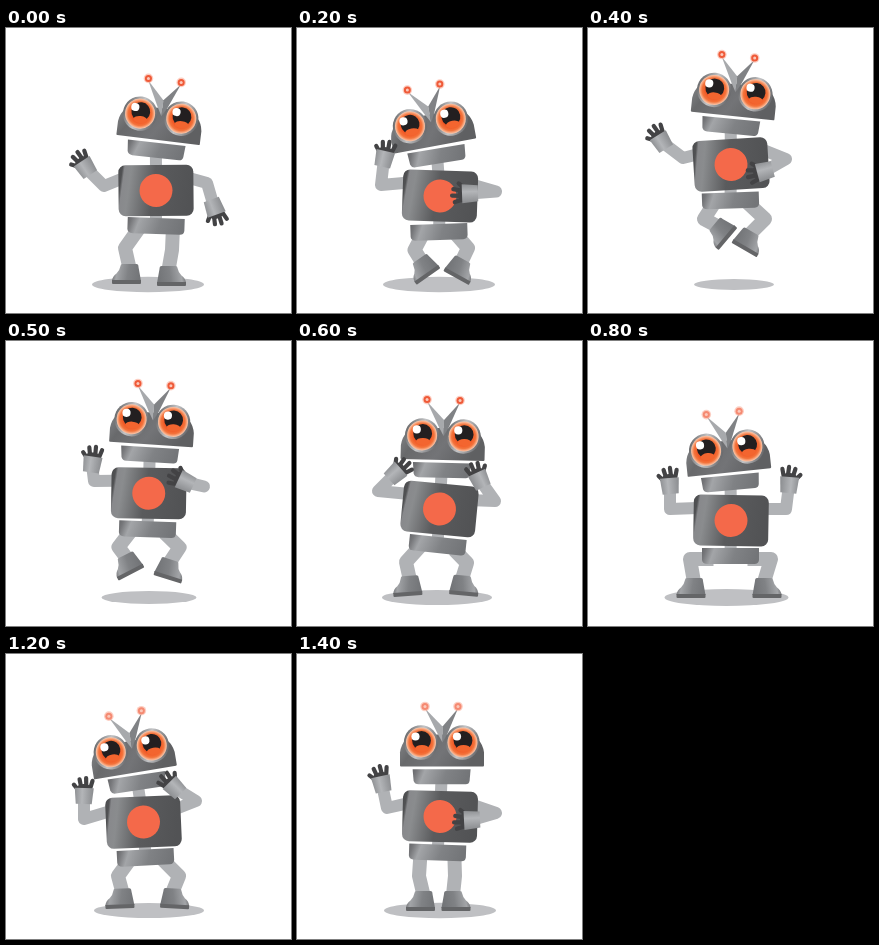
These frames come from a looping animation (285 px wide and 285 px high, 1.5 s). An HTML page:

```html
<!DOCTYPE html>
<html lang="en">
<head>
<meta charset="utf-8">
<title>Dancing robot</title>
<style>
html, body { margin: 0; width: 100%; height: 100%; overflow: hidden; background: #fff; }
svg { display: block; width: 100vw; height: 100vh; }
.pose { display: none; }
.pose.on { display: inline; }
.limb { fill: none; stroke: #b0b2b5; stroke-linejoin: round; }
.finger { fill: none; stroke: #434345; stroke-width: 4.2; stroke-linecap: round; }
</style>
</head>
<body>
<svg id="stage" viewBox="0 0 285 285" xmlns="http://www.w3.org/2000/svg">
  <defs>
    <linearGradient id="plate" x1="0" y1="0" x2="1" y2=".1">
      <stop offset="0" stop-color="#66676a"/><stop offset=".08" stop-color="#77787b"/>
      <stop offset=".22" stop-color="#a3a5a8"/><stop offset=".6" stop-color="#808285"/>
      <stop offset="1" stop-color="#737578"/>
    </linearGradient>
    <linearGradient id="cuff">
      <stop offset="0" stop-color="#8f9194"/><stop offset=".4" stop-color="#b3b5b8"/>
      <stop offset="1" stop-color="#8a8c8f"/>
    </linearGradient>
    <linearGradient id="skull" x1="0" y1="0" x2="1" y2=".25">
      <stop offset="0" stop-color="#85878a"/><stop offset=".25" stop-color="#68696b"/>
      <stop offset=".6" stop-color="#737477"/><stop offset="1" stop-color="#5f6062"/>
    </linearGradient>
    <linearGradient id="chest" x1="0" y1="0" x2="1" y2=".1">
      <stop offset="0" stop-color="#4a4b4d"/><stop offset=".06" stop-color="#515254"/>
      <stop offset=".09" stop-color="#88898c"/><stop offset=".18" stop-color="#8a8c8e"/>
      <stop offset=".5" stop-color="#5a5b5d"/><stop offset="1" stop-color="#525355"/>
    </linearGradient>
    <linearGradient id="rim" x1="0" y1=".2" x2="1" y2=".5">
      <stop offset="0" stop-color="#5e5f61"/><stop offset=".5" stop-color="#c3c4c6"/>
      <stop offset="1" stop-color="#6b6c6f"/>
    </linearGradient>
    <radialGradient id="iris">
      <stop offset=".55" stop-color="#f05523"/><stop offset=".8" stop-color="#f4743c"/>
      <stop offset="1" stop-color="#fbc9ad"/>
    </radialGradient>

    <g id="eye">
      <circle r="17.2" fill="url(#rim)"/>
      <circle r="15" fill="url(#iris)"/>
      <circle cx=".5" cy="-2" r="9.4" fill="#231f20"/>
      <ellipse cx="1" cy="6" rx="7" ry="3.6" fill="#f3652f"/>
      <circle cx="-5.5" cy="-6" r="4.1" fill="#fff"/>
    </g>
    <g id="head">
      <path d="M-42-1V-14Q-40-30-24-32H24Q40-30 42-14V-1Q42 0 41 0H-41Q-42 0-42-1Z" fill="url(#skull)"/>
      <path d="M-17-58 .5-40V-24L-4.500-33Z" fill="#a7a9ac"/>
      <path d="M16-58 .5-40V-24L5.500-33Z" fill="#808285"/>
      <use href="#eye" x="-21" y="-24"/>
      <use href="#eye" x="20.5" y="-24"/>
    </g>
    <path id="jaw" d="M-29-7.5H29L28 4Q27.500 7.500 24 7.500H-23Q-27 7.500-28 4Z" fill="url(#plate)"/>
    <path id="hips" d="M-28.500-8H28.500V4Q28 8 24 8H-23Q-28 8-28.500 4Z" fill="url(#plate)"/>
    <g id="torso">
      <rect x="-37.500" y="-25.500" width="75" height="51" rx="7" fill="url(#chest)"/>
      <circle r="16.500" fill="#f4694a"/>
    </g>
    <g id="foot">
      <path d="M-4-20H10Q12-20 12-17L14.500-3H-14.500Q-14-8-10-10.500-7-13-6-18-6-20-4-20Z" fill="url(#plate)"/>
      <path d="M-14.500-4H14.500V-1Q14.500 0 13.500 0H-13.500Q-14.500 0-14.500-1Z" fill="#646567"/>
    </g>
    <g id="hand">
      <path class="finger" d="M-7-7-10.500-11M-3-8-5-16.500M2-8 1.500-18M6-8 8-15.500"/>
      <path d="M-8-7Q-7-12 0-12T8-7Z" fill="#434345"/>
      <path d="M-9.500-8H9.500L8 8H-8Z" fill="url(#cuff)"/>
    </g>
  </defs>
</svg>
<script>
// head, body, hips, feet: x, y, turn.  arms: elbow, hand, turn.  knees: left, right.  shade: x, radius.
const wave = {
  head: [152, 112, 7], body: [150, 162.5, -.5], hips: [150, 198, 2],
  footL: [120.5, 256, 0], footR: [165.5, 258, 0], knees: [119, 220, 166, 222],
  armL: [98, 158, 80, 140, -33], armR: [201, 155, 208, 179, 160], shade: [142, 56]
};
const crouch = {
  head: [138, 118, -10.5], body: [143, 168, 2], hips: [142, 204, -2],
  footL: [131.5, 248.5, -35], footR: [159, 250, 29], knees: [117.5, 222, 171, 220],
  armL: [84, 157, 87, 131, 13], armR: [199, 163.5, 173, 165.5, 268], shade: [142, 56]
};
const leap = {
  head: [144.5, 88, 6], body: [143, 136.5, -3.5], hips: [142.5, 172.5, -2],
  footL: [140, 211, -50], footR: [156, 222, 30], knees: [116, 191, 177, 191],
  armL: [95, 130, 74, 114, -32], armR: [198, 131, 177, 143, 255], shade: [146, 40]
};
const cheeks = {
  head: [145.5, 119, 1.5], body: [142.5, 168, 5.5], hips: [140.5, 204, 6],
  footL: [111, 255, -4], footR: [166.5, 254.5, 5], knees: [109, 221, 170, 222],
  armL: [81, 150, 98, 133, 48], armR: [198, 160, 183, 139, 335], shade: [140, 55]
};
const squat = {
  head: [141.5, 131.5, -6], body: [143, 179.5, 1], hips: [142.5, 215, 0],
  footL: [103, 257, 0], footR: [179, 257, 0], knees: [102, 218, 183, 218],
  armL: [82, 168, 82, 145, -5], armR: [198, 168, 201, 144, 5], shade: [138.5, 62], glow: [1]
};
const lean = {
  head: [129.5, 118.5, -9.5], body: [137.5, 168, -2.5], hips: [139.5, 203.5, -3],
  footL: [114, 254.5, -2], footR: [168.5, 254.5, 3], knees: [112, 222, 173, 222],
  armL: [78, 165, 78, 142, 2], armR: [190, 147, 169, 134, -45], shade: [143, 55], glow: [1]
};
const stand = {
  head: [145, 112.5, 0], body: [143, 162.5, 1.5], hips: [140.5, 198.5, 2],
  footL: [123.5, 257, 0], footR: [159, 257, 0], knees: [122, 222, 158, 222],
  armL: [90, 154, 85, 130, -12], armR: [199, 159, 175, 166, -93], shade: [143, 56], glow: [1]
};

const mid = (a, b, extra) => {
  const out = {};
  for (const k in a) out[k] = a[k].map((v, i) => (v + (b[k] || [0])[i]) / 2);
  return Object.assign(out, extra);
};
const lift = (p, dy) => {
  const out = { ...p };
  for (const k of ['head', 'body', 'hips']) out[k] = [p[k][0], p[k][1] + dy, p[k][2]];
  return out;
};

const dance = [
  [0, wave], [100, mid(wave, crouch)], [200, crouch], [300, mid(crouch, leap)],
  [400, leap], [500, mid(leap, cheeks)], [600, cheeks], [800, squat],
  [1000, mid(squat, lean, { armR: [198, 165, 214, 147, 40] })],
  [1200, lean], [1300, lift(mid(lean, stand), -10)], [1400, stand]
];
const LOOP = 1500;

const place = (id, [x, y, r], flip = 1) =>
  `<use href="#${id}" transform="translate(${x} ${y}) rotate(${r}) scale(${flip} 1)"/>`;
const limb = (width, ...pts) =>
  `<polyline class="limb" stroke-width="${width}" points="${pts.join(' ')}"/>`;
// Point (dx, dy) in a turned part
const at = ([x, y, r], dx, dy) => {
  const a = r * Math.PI / 180, c = Math.cos(a), s = Math.sin(a);
  return [x + dx * c - dy * s, y + dx * s + dy * c];
};
const bulb = (head, dx, glow) => {
  const [x, y] = at(head, dx, -60);
  const dot = (r, fill, o = 1) => `<circle cx="${x}" cy="${y}" r="${r}" fill="${fill}" opacity="${o}"/>`;
  return dot(4.8, '#f9a590', .55) + dot(3.5, glow ? '#f58a72' : '#ef5a38') + dot(1.5, '#fbc9bb');
};

const robot = p => {
  const { head, body, hips, footL, footR, knees, armL, armR, shade, glow } = p;
  const jaw = [head[0] - .4 - .24 * head[2], head[1] + 10.2, head[2] * .9];
  const leg = (side, knee, foot) => limb(14, at(hips, 17 * side, 3), knee, at(foot, -3 * side, -16));
  const arm = (side, a) => limb(12, at(body, 34 * side, -12), a.slice(0, 2), a.slice(2, 4));
  return `<ellipse cx="${shade[0]}" cy="256.5" rx="${shade[1]}" ry="${shade[1] / 7.3}" fill="#bfc0c3"/>`
    + leg(-1, knees.slice(0, 2), footL) + leg(1, knees.slice(2), footR)
    + place('foot', footL) + place('foot', footR, -1)
    + arm(-1, armL) + arm(1, armR)
    + limb(12, jaw.slice(0, 2), body.slice(0, 2), hips.slice(0, 2))
    + place('hips', hips) + place('torso', body) + place('jaw', jaw) + place('head', head)
    + bulb(head, -17, glow) + bulb(head, 16, glow)
    + place('hand', armL.slice(2)) + place('hand', armR.slice(2), -1);
};

const poses = dance.map(([, p]) => {
  const g = document.createElementNS('http://www.w3.org/2000/svg', 'g');
  g.setAttribute('class', 'pose');
  g.innerHTML = robot(p);
  return document.getElementById('stage').appendChild(g);
});

const show = () => {
  const t = performance.now() % LOOP;
  const now = dance.filter(([start]) => start <= t).length - 1;
  poses.forEach((g, i) => g.classList.toggle('on', i === now));
  requestAnimationFrame(show);
};
show();
</script>
</body>
</html>
```
